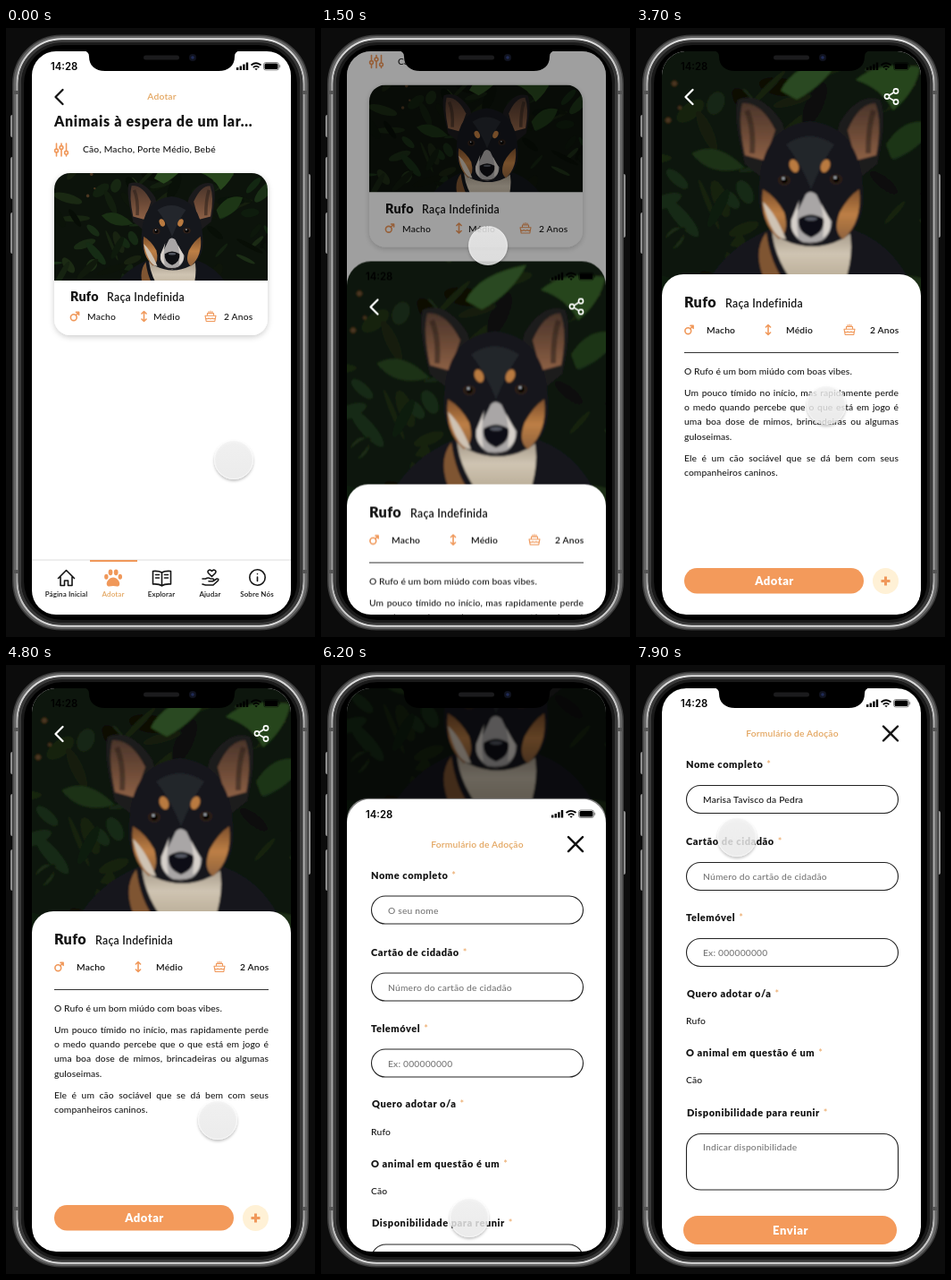
Recreate the animation shown at these times as an HTML page. Size 346 by 680 pixels, loop 8 s.

```html
<!DOCTYPE html>
<html lang="pt">
<head>
<meta charset="utf-8">
<title>Adotar</title>
<style>
html, body { margin: 0; width: 100%; height: 100%; overflow: hidden; background: #0c0c0c; }
svg { display: block; width: 346px; height: 680px; }
text, p { font: 500 10.3px Lato, "Open Sans", sans-serif; letter-spacing: .18px; fill: #141414; }
.mid { text-anchor: middle; }
.semi { font-weight: 600; }
.title { font-weight: 900; font-size: 16px; letter-spacing: .68px; }
.name { font-weight: 900; font-size: 14.3px; letter-spacing: .3px; }
.big { font-size: 16.2px; }
.breed { font-weight: 600; font-size: 12.3px; letter-spacing: .25px; }
.label { font-weight: 900; font-size: 11px; letter-spacing: .55px; }
.label tspan { font-weight: 500; fill: #eba765; }
.hint { fill: #777; }
.head { font-weight: 600; fill: #e3a55f; }
.cta { font-weight: 900; font-size: 13px; letter-spacing: .5px; fill: #fff; }
.tab { font-weight: 600; font-size: 8px; letter-spacing: .12px; }
.clock { font: 600 11.3px Inter, Roboto, sans-serif; letter-spacing: 0; fill: #000; }
.line { fill: none; stroke: #141414; stroke-width: 1.6; stroke-linecap: round; stroke-linejoin: round; }
.thin { stroke-width: 1.1; }
.thick { stroke-width: 2.3; }
.orange { stroke: #f0985a; }
.white { stroke: #fff; }
.ring { fill: none; }
.field { fill: #fff; stroke: #222; stroke-width: 1.1; }
p { margin: 0 0 7.7px; width: 240px; line-height: 16.3px; letter-spacing: .08px; color: #1a1a1a; }
p span { display: block; text-align: justify; text-align-last: justify; }
p span:last-child { text-align-last: left; }

.move { animation: 8s linear infinite; }
#list { animation-name: listOut; }
#detail { animation-name: detailIn; }
#detailBack { animation-name: detailOut; }
#form { animation-name: formIn; }
#listDim { animation-name: dimList; }
#detailDim { animation-name: dimDetail; }
#cursor { animation-name: wander; }
#empty { animation-name: vanish; }
#filled { animation-name: appear; }

@keyframes listOut {
  0% { transform: none; }
  17.082% { transform: translateY(0); animation-timing-function: ease-out; }
  20.832%, 100% { transform: translateY(-157px); }
}
@keyframes detailIn {
  0% { transform: translateY(629px); }
  17.082% { transform: translateY(629px); animation-timing-function: ease-out; }
  20.832%, 100% { transform: translateY(0); }
}
@keyframes detailOut {
  0% { transform: translateY(0); }
  75.187% { transform: translateY(0); animation-timing-function: ease-out; }
  78.937%, 100% { transform: translateY(-157px); }
}
@keyframes formIn {
  0% { transform: translateY(629px); }
  75.187% { transform: translateY(629px); animation-timing-function: ease-out; }
  78.937%, 100% { transform: translateY(0); }
}
@keyframes dimList {
  0% { opacity: 0; }
  17.082% { opacity: 0; animation-timing-function: ease-out; }
  20.832%, 100% { opacity: .6; }
}
@keyframes dimDetail {
  0% { opacity: 0; }
  75.187% { opacity: 0; animation-timing-function: ease-out; }
  78.937%, 100% { opacity: .6; }
}
@keyframes vanish { 0%, 91.24% { opacity: 1; } 91.25%, 100% { opacity: 0; } }
@keyframes appear { 0%, 91.24% { opacity: 0; } 91.25%, 100% { opacity: 1; } }
@keyframes wander {
  0% { transform: translate(255px, 482px); animation-timing-function: ease-in-out; }
  15.5% { transform: translate(187px, 243px); }
  19.5% { transform: translate(187px, 243px); }
  31.25% { transform: translate(162px, 352px); }
  46.25% { transform: translate(213px, 421px); }
  60% { transform: translate(237px, 508px); animation-timing-function: ease-in-out; }
  71% { transform: translate(162px, 617px); }
  77.5% { transform: translate(166px, 617px); animation-timing-function: ease-in-out; }
  89.5% { transform: translate(112px, 150px); }
  92.5% { transform: translate(112px, 150px); animation-timing-function: ease-in; }
  98.75% { transform: translate(113px, 192px); }
  100% { transform: translate(113px, 204px); }
}
</style>
</head>
<body>
<svg viewBox="0 0 346 680">
  <defs>
    <linearGradient id="metal" x2="0" y2="1">
      <stop offset="0" stop-color="#e2e2e2"/><stop offset=".1" stop-color="#a8a8a8"/>
      <stop offset=".5" stop-color="#b4b4b4"/><stop offset=".9" stop-color="#a0a0a0"/>
      <stop offset="1" stop-color="#dadada"/>
    </linearGradient>
    <linearGradient id="disc" x2="0" y2="1">
      <stop offset="0" stop-color="#f4f4f4"/><stop offset="1" stop-color="#eee"/>
    </linearGradient>
    <linearGradient id="ear" x2="0" y2="1">
      <stop offset="0" stop-color="#4a352b"/><stop offset=".5" stop-color="#6b4936"/>
      <stop offset="1" stop-color="#8d6146"/>
    </linearGradient>
    <linearGradient id="tan" x2="0" y2="1">
      <stop offset="0" stop-color="#7d4f2b"/><stop offset=".5" stop-color="#bd7f45"/>
      <stop offset="1" stop-color="#8f623d"/>
    </linearGradient>
    <linearGradient id="chest" x2="0" y2="1">
      <stop offset="0" stop-color="#8e8273"/><stop offset=".5" stop-color="#cfc4b2"/>
      <stop offset="1" stop-color="#b3a68f"/>
    </linearGradient>
    <filter id="soft"><feGaussianBlur stdDeviation="1.3"/></filter>
    <filter id="cardShade" x="-10%" y="-10%" width="120%" height="125%">
      <feDropShadow dx="0" dy="2" stdDeviation="3" flood-opacity=".2"/>
    </filter>
    <filter id="discShade" x="-30%" y="-30%" width="160%" height="160%">
      <feDropShadow dx="0" dy="2" stdDeviation="1.5" flood-opacity=".3"/>
    </filter>
    <clipPath id="screen"><rect x="29" y="26" width="290" height="629" rx="27"/></clipPath>
    <clipPath id="cardTop"><path d="M54 282V180a18 18 0 0 1 18-18H275a18 18 0 0 1 18 18V282Z"/></clipPath>

    <g id="status">
      <text class="clock" x="50" y="47">14:28</text>
      <path d="M258 47v-3h2.4v3zM261.600 47v-4.600h2.4v4.600zM265.200 47v-6.400h2.4v6.400zM268.800 47v-8.500h2.4v8.500z"/>
      <path d="M274.500 41.500q5.500-4.500 11 0M276.800 44q3.300-2.800 6.600 0" fill="none" stroke="#000" stroke-width="1.700"/>
      <path d="M278.300 45.300h3.600l-1.800 2z"/>
      <rect x="288.500" y="38.500" width="17" height="8.500" rx="2.400" fill="none" stroke="#000" stroke-opacity=".45"/>
      <rect x="289.500" y="39.500" width="15" height="6.500" rx="1.500"/>
      <path d="M306.700 41.200v3" stroke="#000" stroke-opacity=".5"/>
    </g>
    <path id="back" d="M63.500 69 55.500 77l8 8"/>

    <!-- trait icons, centred on 0,0 -->
    <g id="male" class="line orange"><circle cx="-1.200" cy="1.200" r="3.400"/><path d="M1.300-1.300 4.500-4.500M1.500-4.600h3.100v3.100"/></g>
    <path id="size" class="line orange" d="M0-5.300V5.300M-2.600-3 0-5.500 2.600-3M-2.600 3 0 5.500 2.600 3"/>
    <path id="cake" class="line orange thin" d="M-4.800 5.500H4.800L6-.8H-6zM-5.500 2q1.800 1.600 3.600 0q1.900 1.600 3.800 0q1.800 1.600 3.600 0M-3.500-1v-2.500h7V-1M-2-3.500v-2M2-3.500v-2M0-3.500v-2.500"/>

    <g id="photo" filter="url(#soft)">
      <rect x="-50" y="0" width="450" height="300" fill="#0c130b"/>
      <g id="leaves"></g>
      <path d="M162 70Q176 40 230 30Q214 62 180 80Z" fill="#2b4a20"/>
      <path d="M246 58Q272 36 318 44Q314 70 288 92Q276 68 246 58Z" fill="#27451c"/>
      <path d="M280 130Q300 98 330 106Q322 136 286 146Z" fill="#1d3616"/>
      <path d="M62 140Q90 124 122 156Q84 168 62 140Z" fill="#1a3014"/>
      <g fill="#8b5a35" opacity=".5"><circle cx="43" cy="62" r="3"/><circle cx="36" cy="103" r="3"/><circle cx="49" cy="89" r="2"/></g>
      <path d="M72 300Q92 250 146 226H246Q294 244 314 300Z" fill="#12141a"/>
      <path d="M152 214Q150 252 180 290H232Q246 250 238 222Z" fill="url(#chest)"/>
      <path d="M146 228Q150 262 168 286L148 290Q128 252 146 228Z" fill="#7f5532"/>
      <path d="M122 152Q108 98 114 80Q140 70 164 106L172 138L142 168Z" fill="#1b1a1c"/>
      <path d="M122 142Q114 104 119 84Q140 82 156 114L144 148Z" fill="url(#ear)"/>
      <path d="M270 152Q282 98 273 80Q248 72 228 106L220 138L250 168Z" fill="#1b1a1c"/>
      <path d="M269 142Q276 104 268 84Q250 84 237 114L246 148Z" fill="url(#ear)"/>
      <path d="M124 92Q132 110 130 140M266 92Q260 110 260 140" fill="none" stroke="#2a1f1b" stroke-width="6" opacity=".55"/>
      <path d="M138 178Q140 110 195 104Q250 110 254 178Q258 222 230 236Q198 252 164 236Q134 216 138 178Z" fill="#15171c"/>
      <path d="M168 130Q194 112 222 130Q208 150 196 180Q184 150 168 130Z" fill="#23262c"/>
      <path d="M142 180Q156 188 166 206Q172 228 160 236Q138 216 142 180Z" fill="url(#tan)"/>
      <path d="M250 180Q238 188 228 206Q220 228 232 236Q254 216 250 180Z" fill="url(#tan)"/>
      <path d="M142 194Q156 206 168 236Q152 236 142 194Z" fill="#cfc3b4"/>
      <path d="M190 186Q195 180 202 186Q210 204 219 216Q218 238 196 242Q174 238 174 216Q182 204 190 186Z" fill="#a9a6a6"/>
      <path d="M183 192Q178 216 182 234Q172 228 174 214ZM207 196Q212 216 209 234Q220 228 217 214Z" fill="#d6d0ca"/>
      <path d="M182 213Q196 204 210 213Q212 228 196 234Q180 228 182 213Z" fill="#0e0f13"/>
      <path d="M182 239q14 4 28-1" fill="none" stroke="#2a2728" stroke-width="2"/>
      <ellipse cx="196" cy="213" rx="7" ry="2" fill="#555963"/>
      <ellipse cx="177" cy="154" rx="5" ry="7.500" transform="rotate(-22 177 154)" fill="#b97a40"/>
      <ellipse cx="212" cy="154" rx="5" ry="7.500" transform="rotate(22 212 154)" fill="#b97a40"/>
      <g fill="#2f2019"><ellipse cx="166" cy="170" rx="7" ry="5.500"/><ellipse cx="224" cy="169" rx="7" ry="5.500"/></g>
      <g fill="#050505"><circle cx="166" cy="170" r="3.600"/><circle cx="224" cy="169" r="3.600"/></g>
      <g fill="#c8d0da"><circle cx="165" cy="168" r="1.300"/><circle cx="223" cy="167" r="1.300"/></g>
    </g>
  </defs>

  <!-- phone body: one silver band fading into the black bezel -->
  <g fill="#8f8f8f">
    <rect x="5" y="97" width="5" height="25" rx="2"/><rect x="5" y="144" width="5" height="47" rx="2"/>
    <rect x="5" y="206" width="5" height="46" rx="2"/><rect x="336" y="163" width="5" height="71" rx="2"/>
  </g>
  <rect x="8" y="8.500" width="330" height="663" rx="54" fill="#000" stroke="#3c3c3c" stroke-width="2"/>
  <rect class="ring" x="10" y="10.500" width="326" height="659" rx="52" stroke="#666" stroke-width="3"/>
  <rect class="ring" x="12.500" y="12.500" width="321" height="655" rx="50" stroke="url(#metal)" stroke-width="2.400"/>
  <rect class="ring" x="15.500" y="15" width="315" height="650" rx="47" stroke="#3a3a3a" stroke-width="3.500"/>
  <rect class="ring" x="18.500" y="17.500" width="309" height="645" rx="45" stroke="#1a1a1a" stroke-width="3"/>
  <path d="M8 72h6M8 607h6M332 72h6M332 607h6" stroke="#555" stroke-width="4"/>

  <g clip-path="url(#screen)">
    <g id="list" class="move">
      <rect x="29" y="26" width="290" height="629" fill="#fff"/>
      <use href="#status"/>
      <use href="#back" class="line thick"/>
      <text class="mid head" x="174.500" y="80">Adotar</text>
      <text class="title" x="54" y="109.500">Animais à espera de um lar...</text>
      <g class="line orange">
        <path d="M56.500 129v6M56.500 139v4M62 129v2.500M62 136v7M67.500 129v8M67.500 142v1"/>
        <circle cx="56.500" cy="137" r="1.900"/><circle cx="62" cy="133.500" r="1.900"/><circle cx="67.500" cy="139.300" r="1.900"/>
      </g>
      <text x="86" y="139">Cão, Macho, Porte Médio, Bebé</text>

      <rect x="54" y="162" width="239" height="181" rx="18" fill="#fff" filter="url(#cardShade)"/>
      <g clip-path="url(#cardTop)"><use href="#photo" transform="translate(186 257) scale(.59) translate(-196 -221)"/></g>
      <text class="name" x="72" y="305">Rufo</text>
      <text class="breed" x="113" y="305">Raça Indefinida</text>
      <use href="#male" x="77" y="322"/><text x="91" y="326">Macho</text>
      <use href="#size" x="154.500" y="322"/><text x="165" y="326">Médio</text>
      <use href="#cake" x="229" y="322"/><text x="244" y="326">2 Anos</text>

      <rect x="29" y="593" width="290" height="2" fill="#eee"/>
      <rect x="94" y="594" width="53" height="2" fill="#f0985a"/>
      <path class="line" d="M58.500 614.500 67.500 605.500l9 9M61 613v9.500h4.500v-5.500h4v5.500H74V613"/>
      <g fill="#f0985a">
        <path d="M120 613.500c4 0 8.500 5 7 8.500c-1.200 2.600-4.500 1-7 1s-5.800 1.600-7-1c-1.500-3.500 3-8.500 7-8.500z"/>
        <ellipse cx="112.300" cy="612.800" rx="2.200" ry="3"/><ellipse cx="117" cy="607.800" rx="2.400" ry="3.400"/>
        <ellipse cx="123.200" cy="607.800" rx="2.400" ry="3.400"/><ellipse cx="127.800" cy="612.800" rx="2.200" ry="3"/>
      </g>
      <path class="line" d="M174.500 608q-3-2-10-1.500V621q7-.5 10 2q3-2.500 10-2V606.500q-7-.5-10 1.500V623M167.500 610.500h4M167.500 614h4M177.500 610.500h4M177.500 614h4"/>
      <path class="line" d="M230.500 612.500l-3.800-3.700c-2.200-2.600 1.400-5.200 3.800-2.400c2.400-2.800 6-.2 3.800 2.400zM220 615h3.500q3-2 5.500 0h3q1.500 1.500-.5 2.800h-4.500M232 617.500l4-2.500q2.500-.3 1.500 2l-5.500 5h-8.500l-3.500-1"/>
      <g class="line"><circle cx="281.500" cy="613.500" r="8.700"/><path d="M281.500 613v4.500M281.500 609.500v.1"/></g>
      <g class="mid">
        <text class="tab" x="67.500" y="635">Página Inicial</text>
        <text class="tab head" x="120" y="635">Adotar</text>
        <text class="tab" x="174" y="635">Explorar</text>
        <text class="tab" x="228.500" y="635">Ajudar</text>
        <text class="tab" x="281" y="635">Sobre Nós</text>
      </g>
      <rect id="listDim" class="move" x="29" y="26" width="290" height="629"/>
    </g>

    <g id="detail" class="move"><g id="detailBack" class="move">
      <g clip-path="url(#screen)">
        <use href="#photo"/>
        <use href="#status"/>
        <use href="#back" class="line white thick"/>
        <g class="line white">
          <circle cx="281" cy="76.500" r="2.600"/><circle cx="291" cy="70.500" r="2.600"/><circle cx="291" cy="82.500" r="2.600"/>
          <path d="M283.400 75.200 288.600 72M283.400 77.900 288.600 81"/>
        </g>
        <rect x="29" y="275" width="290" height="400" rx="24" fill="#fff"/>
        <text class="name big" x="54" y="311.500">Rufo</text>
        <text class="breed" x="100" y="311.500">Raça Indefinida</text>
        <use href="#male" x="59.500" y="337"/><text class="semi" x="79" y="340.500">Macho</text>
        <use href="#size" x="148" y="337"/><text class="semi" x="168" y="340.500">Médio</text>
        <use href="#cake" x="239" y="337"/><text class="semi" x="262" y="340.500">2 Anos</text>
        <path d="M54 362.500H294" stroke="#333"/>
        <foreignObject x="54" y="374.700" width="242" height="150">
          <p><span>O Rufo é um bom miúdo com boas vibes.</span></p>
          <p><span>Um pouco tímido no início, mas rapidamente perde</span>
            <span>o medo quando percebe que o que está em jogo é</span>
            <span>uma boa dose de mimos, brincadeiras ou algumas</span>
            <span>guloseimas.</span></p>
          <p><span>Ele é um cão sociável que se dá bem com seus</span>
            <span>companheiros caninos.</span></p>
        </foreignObject>
        <rect x="54" y="603" width="201" height="28.500" rx="14.250" fill="#f39a5b"/>
        <text class="mid cta" x="155" y="622">Adotar</text>
        <circle cx="279.500" cy="617.500" r="14.500" fill="#fff1d6"/>
        <path d="M274.500 617.500h10M279.500 612.500v10" stroke="#f0985a" stroke-width="3"/>
        <rect id="detailDim" class="move" x="29" y="26" width="290" height="629"/>
      </g>
    </g></g>

    <g id="form" class="move">
      <rect x="29" y="26" width="290" height="629" rx="27" fill="#fff"/>
      <use href="#status"/>
      <text class="mid head" x="175" y="80">Formulário de Adoção</text>
      <path d="M277 68.500l16 16M293 68.500l-16 16" stroke="#111" stroke-width="2.400" stroke-linecap="round"/>

      <text class="label" x="56" y="115">Nome completo<tspan dx="4">*</tspan></text>
      <rect class="field" x="56.500" y="134.500" width="237" height="31" rx="15.500"/>
      <text id="empty" class="hint move" x="75" y="154">O seu nome</text>
      <text id="filled" class="move" x="75" y="154">Marisa Tavisco da Pedra</text>

      <text class="label" x="56" y="201">Cartão de cidadão<tspan dx="4">*</tspan></text>
      <rect class="field" x="56.500" y="220.500" width="237" height="31" rx="15.500"/>
      <text class="hint" x="75" y="240">Número do cartão de cidadão</text>

      <text class="label" x="56" y="286">Telemóvel<tspan dx="4">*</tspan></text>
      <rect class="field" x="56.500" y="305.500" width="237" height="31" rx="15.500"/>
      <text class="hint" x="75" y="325">Ex: 000000000</text>

      <text class="label" x="57" y="370.500">Quero adotar o/a<tspan dx="4">*</tspan></text>
      <text x="56" y="401">Rufo</text>
      <text class="label" x="56" y="437">O animal em questão é um<tspan dx="4">*</tspan></text>
      <text x="56" y="467">Cão</text>
      <text class="label" x="57" y="503.500">Disponibilidade para reunir<tspan dx="4">*</tspan></text>
      <rect class="field" x="56.500" y="523.500" width="237" height="62.500" rx="16"/>
      <text class="hint" x="75" y="542">Indicar disponibilidade</text>
      <rect x="53" y="615" width="239" height="32" rx="16" fill="#f49a5b"/>
      <text class="mid cta" x="173" y="635.500">Enviar</text>
    </g>
  </g>

  <!-- notch -->
  <path d="M87 25.500Q93 26 93 32C93 42 100 48 111 48H238C249 48 256 42 256 32Q256 26 262 25.500Z"/>
  <rect x="154" y="30.500" width="40" height="5" rx="2.500" fill="#1b1b1d"/>
  <circle cx="209" cy="33" r="4" fill="#10131f"/><circle cx="209" cy="33" r="1.800" fill="#1f2a55"/>

  <g id="cursor" class="move">
    <circle r="21.500" fill="url(#disc)" fill-opacity=".8" stroke="#fff" stroke-opacity=".6" filter="url(#discShade)"/>
  </g>
</svg>
<script>
// Seeded foliage behind the dog
let seed = 11;
const rand = (lo, hi) => {
  seed = (seed * 16807) % 2147483647;
  return lo + (hi - lo) * seed / 2147483647;
};
const leaves = document.getElementById("leaves");
for (let i = 0; i < 90; i++) {
  const leaf = document.createElementNS("http://www.w3.org/2000/svg", "ellipse");
  const place = `translate(${rand(-45, 395)} ${rand(15, 290)}) rotate(${rand(-70, 70)})`;
  leaf.setAttribute("transform", place);
  leaf.setAttribute("rx", rand(12, 32));
  leaf.setAttribute("ry", rand(3, 10));
  leaf.setAttribute("fill", `hsl(${rand(92, 118)} 36% ${rand(3, 14)}%)`);
  leaves.append(leaf);
}
</script>
</body>
</html>
```
